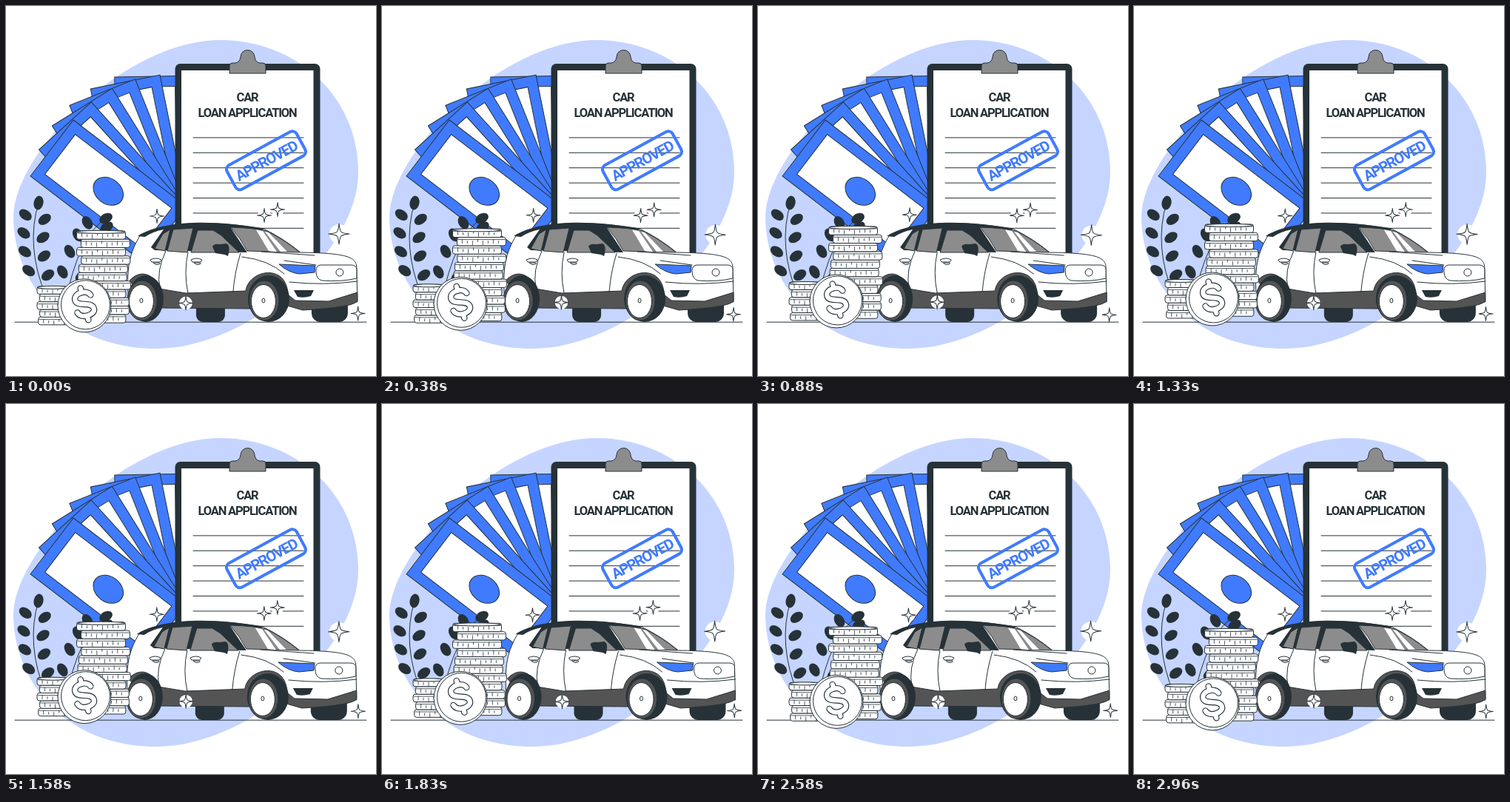
An HTML page for the animation above (3 s loop, 500 by 500 pixels).

```html
<!DOCTYPE html>
<html lang="en">
<head>
<meta charset="utf-8">
<title>Car loan application</title>
<style>
  html, body { margin: 0; width: 100%; height: 100%; overflow: hidden; background: #fff; }
  svg { display: block; width: 100vw; height: 100vh; }
  text { font-family: Roboto, "Liberation Sans", sans-serif; font-weight: 700; letter-spacing: -.07em; text-anchor: middle; }
  .line { fill: none; stroke: #263238; stroke-linecap: round; stroke-linejoin: round; }
  .paper { fill: #fff; stroke: #263238; stroke-linejoin: round; }
  .ink { fill: #263238; }
  .blue { fill: #407bff; stroke: #263238; stroke-linejoin: round; }
  .glass { fill: #8c8c8c; stroke: #263238; stroke-linejoin: round; }
  .trim { fill: #545454; stroke: #263238; stroke-linejoin: round; }
</style>
</head>
<body>
<svg viewBox="0 0 500 500">
  <path fill="#c5d5ff" d="M290 46C390 46 476 120 476 225S330 463 203 463S10 370 10 285S160 46 290 46Z"/>
  <g id="notes"></g>

  <g id="clipboard">
    <rect class="ink" x="228.500" y="78" width="196" height="290" rx="7"/>
    <rect fill="#fff" x="237" y="87" width="178.500" height="270"/>
    <path class="glass" d="M302 91V81Q302 77 306 77H310Q316 76 317 69A9.500 9.500 0 0 1 336 69Q337 76 343 77H347Q351 77 351 81V91Z"/>
    <g class="ink" font-size="16.500">
      <text x="326" y="128.500">CAR</text>
      <text x="326" y="149.500">LOAN APPLICATION</text>
    </g>
    <g id="rules"></g>
    <g transform="translate(351.500 208.800) rotate(-28.500)" fill="#407bff">
      <rect x="-53.500" y="-18.500" width="107" height="37" rx="6.500" fill="none" stroke="#407bff" stroke-width="4"/>
      <text y="7.500" font-size="20">APPROVED</text>
    </g>
  </g>

  <g id="plants"></g>
  <path class="line" d="M12 427.200H487"/>

  <g id="car">
    <rect class="ink" x="257" y="395" width="39" height="32" rx="9"/>
    <rect class="ink" x="413" y="395" width="49" height="32" rx="12"/>
    <path class="paper" d="M182 309C225 287 300 293 348 301Q375 314 398 333C465 334 474 340 474 355L475 400L207 406L166 398C162 355 167 333 182 309Z"/>
    <path class="trim" d="M167 371C181 356 199 360 207 382L243 388L324 385C328 356 380 347 381 390L391 398L436 399L475 387V398Q473 407 401 411L380 405L330 409L208 408L182 390Z"/>

    <path class="ink" d="M178 311C215 287 290 290 349 301L345 304L304 300L326 333L201 330L196 326L213 302Q198 305 188 312Z"/>
    <path class="glass" d="M201 328L212 308L222 302L215 331ZM218 331L226 302L253 300L245 333ZM250 333L259 303H280L291 310L315 333Z"/>
    <path class="glass" d="M304 299Q337 300 352 304Q376 315 397 333L326 331Q317 314 304 299Z"/>
    <path fill="#fff" d="M338 302.500L347 304L366 332L355 331ZM350 305L355 306L380 332H371Z"/>
    <path class="ink" d="M279 325Q281 321 289 322L298 321Q304 324 300 338L296 336L283 334Z"/>
    <path class="line" d="M216 331Q203 358 208 381M246 333Q240 360 246 388M317 334Q309 360 307 386M345 332L417 337M319 339Q355 343 376 362M376 344L419 350M383 373Q430 378 475 372"/>
    <g id="handles"></g>
    <path class="blue" d="M369 349L418 351L417 360L397 362Q383 361 369 349Z"/>
    <path class="paper" d="M426 350H466Q474 350 474 356V368Q453 373 427 371Q419 369 419 358Q419 350 426 350Z"/>
    <circle class="paper" cx="451" cy="360" r="5"/>
    <path class="ink" d="M389 384H416L412 392Q403 395 394 393Z"/>
    <g id="wheels"></g>
  </g>

  <g id="coins"></g>
  <g id="sparkles"></g>
</svg>
<script>
const LOOP = 3000, PHASE = 25;
const $ = id => document.getElementById(id);
const range = (n, draw) => Array.from({ length: n }, (_, i) => draw(i)).join("");

// A fan of equal notes, back to front, each turned about a common pivot.
const NOTES = 6;
$("notes").innerHTML = range(NOTES, i => {
  const k = NOTES - 1 - i;
  return `<g transform="translate(0 ${.4 * k * k}) rotate(${10.3 * k} 239 276) translate(91 154) rotate(37.4)">
    <rect class="blue" width="192" height="95.6"/>
    <rect class="paper" x="14" y="14" width="164" height="67.6"/>
    <ellipse class="blue" cx="96" cy="47.8" rx="22" ry="17"/>
  </g>`;
});

$("rules").innerHTML = range(7, i => `<path class="line" d="M253 ${177.9 + 20.4 * i}H402"/>`);

// Quadratic stem with a leaf at the tip and pairs of leaves along it.
const leaf = (x, y, turn) =>
  `<ellipse class="ink" rx="6.5" ry="9.5" transform="translate(${x} ${y}) rotate(${turn})"/>`;
function plant(tip, bend, root, turn) {
  const at = (t, axis) => (1 - t) ** 2 * tip[axis] + 2 * t * (1 - t) * bend[axis] + t * t * root[axis];
  return `<path class="line" d="M${tip}Q${bend} ${root}"/>` + leaf(...tip, turn) + range(4, i => {
    const t = .17 + .2 * i, x = at(t, 0), y = at(t, 1);
    return leaf(x - 13, y - 4, -60 + turn / 2) + leaf(x + 13, y + 2, 55);
  });
}
$("plants").innerHTML = plant([44, 266], [26, 325], [54, 392], 12) + plant([135, 287], [98, 310], [80, 402], 60);

$("handles").innerHTML = [195, 250].map(x => `
  <path class="paper" d="M${x} 343q8 -4 15 0l-2 3h-11zm4 4h7q4 0 1 2q-4 2 -8 -2z"/>`).join("");

const wheel = (x, y, rx, hubX) => `
  <ellipse class="ink" cx="${x}" cy="${y - 2.5}" rx="${rx}" ry="31.5"/>
  <ellipse class="trim" cx="${hubX + 1}" cy="${y}" rx="20" ry="27"/>
  <ellipse class="paper" cx="${hubX}" cy="${y + 1}" rx="16.5" ry="22.5"/>
  <ellipse class="paper" cx="${hubX}" cy="${y}" rx="2" ry="3"/>`;
$("wheels").innerHTML = wheel(189, 398, 24, 183) + wheel(355, 398, 28, 348);

// One coin seen from the side, with milled edge marks.
const slab = (x, y, w, h) => `
  <rect class="paper" x="${x}" y="${y}" width="${w}" height="${h}" rx="3"/>
  <path class="line" stroke-width=".8" d="M${x + 1} ${y + 3}h${w - 2}${range(Math.floor(w / 7) - 1, i =>
    `M${x + 7 + 7 * i} ${y + (i % 3 ? 5 : 3)}v${i % 2 ? 3 : 5}`)}"/>`;
const stack = (x, top, w, h, n, shift) => range(n, k => {
  const i = n - 1 - k;
  return slab(x + (i ? shift * (.5 + .5 * Math.sin(i * 2.4)) : 0), top + i * h, w, h);
}) + `<ellipse class="paper" cx="${x + w / 2}" cy="${top + 1.5}" rx="${w / 2 - 1}" ry="2"/>`;
const dollar = "M11 -10C8 -19 -11 -18 -11 -8C-11 2 11 -2 11 9C11 18 -9 19 -12 9M0 -22V-16M0 16V22";
$("coins").innerHTML = stack(95.5, 304, 66, 11.3, 11, 7) + stack(42, 379, 42, 10.4, 5, 4) + `
  <circle class="paper" cx="106" cy="405" r="36"/>
  <circle class="paper" cx="107.5" cy="404" r="33"/>
  <g transform="translate(106 403) rotate(-14)">
    <path class="line" stroke-width="8.500" d="${dollar}"/>
    <path class="line" style="stroke:#fff" stroke-width="6.200" d="${dollar}"/>
  </g>`;

// Four-pointed star: one concave side repeated by quarter turns.
function sparkle([x, y, r = 9.5]) {
  const a = .1 * r;
  return `<g transform="translate(${x} ${y})">
    <circle r="${r * .93}" fill="#fff"/>
    <path class="paper" d="M0 ${-r}C${a} ${-a} ${a} ${-a} ${r} 0C${a} ${a} ${a} ${a} 0 ${r}C${-a} ${a} ${-a} ${a} ${-r} 0C${-a} ${-a} ${-a} ${-a} 0 ${-r}Z"/>
  </g>`;
}
$("sparkles").innerHTML = [[204, 284], [349, 283], [367, 275], [450, 308, 14], [243, 401.5], [475.7, 415.5]]
  .map(sparkle).join("");

// Side-to-side shake: ten equal steps, the second half mirroring the first.
const SWINGS = [0, -1, 2, -4, 4, -4];
function shake(p) {
  const step = 10 * Math.min(p, 1 - p), i = Math.min(4, Math.floor(step));
  return SWINGS[i] + (SWINGS[i + 1] - SWINGS[i]) * (step - i);
}
const rise = p => -20 * Math.min(p, 1 - p);
const sway = p => Math.asin(Math.sin(2 * Math.PI * p)) * 2 / Math.PI;

function render(now) {
  const p = (now + PHASE) % LOOP / LOOP;
  $("car").setAttribute("transform", `translate(${shake(p)} 0)`);
  $("coins").setAttribute("transform", `translate(0 ${rise(p)})`);
  $("sparkles").setAttribute("transform", `rotate(${sway(p)} 340 346)`);
}
const start = performance.now();
function tick() {
  render(performance.now() - start);
  requestAnimationFrame(tick);
}
tick();
</script>
</body>
</html>
```
